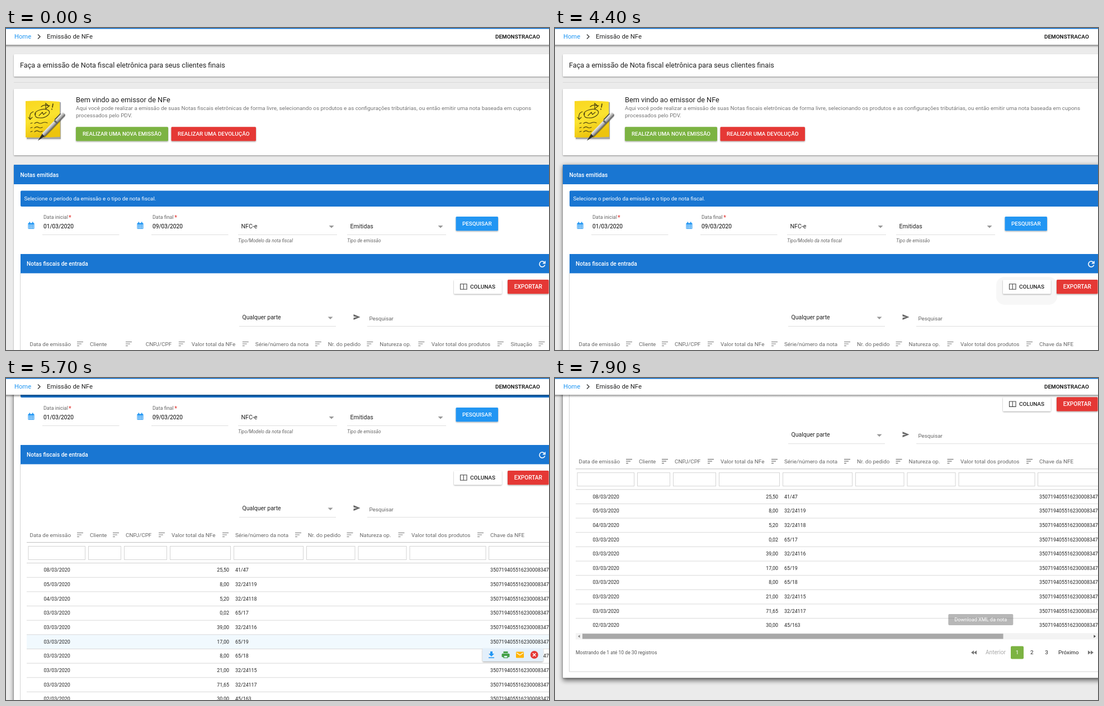
An HTML page that plays this animation: 971x577 px, repeating every 8000 ms.

```html
<!DOCTYPE html>
<html lang="pt">
<head>
<meta charset="utf-8">
<title>Emissão de NFe</title>
<style>
html, body { margin: 0; width: 100%; height: 100%; overflow: hidden; background: #ebebeb; }
svg { display: block; width: 100%; height: 100%; font-family: Roboto, sans-serif; }
text { white-space: pre; }
</style>
</head>
<body>
<svg id="stage" viewBox="0 0 971 577" xmlns="http://www.w3.org/2000/svg"></svg>
<script>
const BLUE = '#1976d2', SKY = '#2196f3', RED = '#e53935', INK = '#212121', GREY = '#757575';
const ROW0 = 616.6, PITCH = 25.65;

const rect = (x, y, w, h, fill, more = '') =>
  `<rect x="${x}" y="${y}" width="${w}" height="${h}" fill="${fill}" ${more}/>`;
const text = (x, y, s, size, fill = INK, more = '') =>
  `<text x="${x}" y="${y}" font-size="${size}" fill="${fill}" ${more}>${s}</text>`;
const path = (d, fill, more = '') => `<path d="${d}" fill="${fill}" ${more}/>`;
const line = (d, stroke, w = 1, more = '') =>
  `<path d="${d}" fill="none" stroke="${stroke}" stroke-width="${w}" ${more}/>`;
const group = (id, body, more = '') => `<g id="${id}" ${more}>${body}</g>`;
const at = (x, y, body) => `<g transform="translate(${x} ${y})">${body}</g>`;

const MED = 'font-weight="500"';
const MID = 'text-anchor="middle"';
const SHADOW = 'filter="url(#shadow)"';

const defs = `<defs>
  <filter id="shadow" x="-10%" y="-20%" width="120%" height="150%">
    <feDropShadow dx="0" dy="1.2" stdDeviation="1.1" flood-opacity=".38"/></filter>
  <filter id="blur" x="-20%" y="-20%" width="140%" height="140%"><feGaussianBlur stdDeviation="4"/></filter>
  <linearGradient id="paper" x1="0" y1="0" x2="0.3" y2="1">
    <stop offset="0" stop-color="#f9d71f"/><stop offset=".55" stop-color="#fbe32f"/><stop offset="1" stop-color="#edc40d"/></linearGradient>
  <linearGradient id="pen" x1="0" y1="0" x2="0" y2="1">
    <stop offset="0" stop-color="#eee"/><stop offset=".5" stop-color="#b5b5b5"/><stop offset="1" stop-color="#555"/></linearGradient>
  <linearGradient id="menuFill" x1="0" y1="0" x2="0" y2="1">
    <stop offset="0" stop-color="#f4f4f4"/><stop offset=".12" stop-color="#fcfcfc"/></linearGradient>
  <linearGradient id="barShade" x1="0" y1="0" x2="0" y2="1">
    <stop offset="0" stop-opacity=".4"/><stop offset="1" stop-opacity="0"/></linearGradient>
</defs>`;

function button(x, y, w, label, fill, size = 9.9) {
  return rect(x, y, w, 25.3, fill, `rx="1.5" ${SHADOW}`) +
    text(x + w / 2, y + 15.7, label, size, '#fff', `${MED} ${MID}`);
}

function stickyNote() {
  const ink = (d, w = 1.2) => line(d, '#4b4210', w, 'stroke-linecap="round"');
  return rect(37, 133, 61, 66, '#000', 'opacity=".35" filter="url(#shadow)"') +
    path('M35 131Q66 129 96 132L97 195Q66 197 35 196Z', 'url(#paper)') +
    ink('M52 156C49 148 68 143 75 147C83 152 72 162 60 161C54 161 51 159 53 153') +
    ink('M59 157L65 151L67 155L72 151') + ink('M49 150Q41 152 43 164L40 160M43 164L47 160') +
    ink('M63 141Q68 136 77 140L71 135V145L78 139') + ink('M84 136L83 142M82 145V146', 1.6) +
    [171, 179, 186].map((y, i) =>
      ink(`M44 ${y}l3 -1M51 ${y}q4 -3 7 -1t7 0${i ? '' : 't9 0'}`)).join('') +
    `<g transform="translate(57 202) rotate(-46)">` +
    rect(11, -2, 56, 7, '#000', 'opacity=".25" rx="3"') +
    path('M0 0L15 -3.2V3.2Z', '#2d2d2d') + rect(14, -3.8, 54, 7.6, 'url(#pen)', 'rx="2.5"') +
    rect(45, -3.8, 3, 7.6, '#666') + line('M48 -4.5H63', '#444', 1.6) + '</g>';
}

const calendar = (x, y) => at(x, y,
  rect(-5.5, -4.5, 11, 10.5, SKY, 'rx="1"') + line('M-2.7 -6.5V-3M2.7 -6.5V-3', SKY, 1.8) +
  line('M-4.6 -.7H4.6M-4.6 1.8H4.6M-4.6 4.3H4.6', '#fff', 1.5, 'stroke-dasharray="1.7 .8"'));
const caret = (x, y) => path(`M${x - 4.5} ${y - 2}h9l-4.5 4.5z`, '#999');
const rule = (x1, x2, y) => line(`M${x1} ${y}H${x2}`, '#dedede');

function dateField(x, label, value, starX) {
  return calendar(x - 22, 354) + text(x, 342, label, 8.95, '#666') +
    text(starX, 343, '*', 10.5, RED, MED) + text(x, 359, value, 10.15, '#000') + rule(x - 2, x + 135.5, 370.5);
}

function selectField(x, value, hint) {
  return text(x + 5.5, 358.5, value, 10.6) + caret(x + 167, 356) + rule(x, x + 177, 370.5) +
    text(x, 384, hint, 8.45, '#666', 'font-style="italic"');
}

// label, text x, sort icon x
const columns = [
  ['Data de emissão', 42.5, 127], ['Cliente', 150, 191], ['CNPJ/CPF', 214, 273],
  ['Valor total da NFe', 296, 387], ['Série/número da nota', 410, 517], ['Nr. do pedido', 540, 609.5],
  ['Natureza op.', 632.5, 701.5], ['Valor total dos produtos', 725, 843]
];
const sortIcon = x => line(`M${x} 562.5h11M${x} 566h8M${x} 569.5h4`, GREY, 1.2);

function headings(withKey) {
  const shift = withKey ? 0 : 35.8;
  const cols = columns.map(([s, x, ix], i) =>
    text(x + (i > 1 ? shift : 0), 570, s, 9.87, '#666') +
    sortIcon(ix + (i > 1 ? shift : i && !withKey ? 23 : 0))).join('');
  return cols + (withKey ? text(866, 570, 'Chave da NFE', 9.87, '#666')
    : text(902.5, 570, 'Situação', 9.87, '#666') + sortIcon(952.5));
}

const invoices = [
  ['08', '25,50', '41/47'], ['05', '8,00', '32/24119'], ['04', '5,20', '32/24118'],
  ['03', '0,02', '65/17'], ['03', '39,00', '32/24116'], ['03', '17,00', '65/19'],
  ['03', '8,00', '65/18'], ['03', '21,00', '32/24115'], ['03', '71,65', '32/24117'],
  ['02', '30,00', '45/163']
];

function tableRows() {
  return invoices.map(([day, total, num], i) => {
    const y = ROW0 + i * PITCH, base = y + 15.8;
    return (i ? line(`M37 ${y}H971`, '#d9d9d9') : '') +
      text(67.5, base, day + '/03/2020', 8.9) + text(399, base, total, 8.9, INK, 'text-anchor="end"') +
      text(410, base, num, 8.9) + text(866, base, '350719405516230008347', 8.9);
  }).join('');
}

function filters() {
  const edges = [[40, 141.5], [147.5, 205.5], [211.5, 287.5], [293.5, 401.5], [407.5, 531.5],
    [537.5, 624], [630, 716], [722, 858], [863.5, 990]];
  return edges.map(([a, b]) => rect(a, 586.5, b - a, 24, '#fff', 'stroke="#d4d4d4"')).join('') +
    line('M37 579.7H971', '#bdbdbd') + line(`M37 ${ROW0}H971`, '#d0d0d0');
}

const actions = group('actions',
  rect(852, -1, 108.5, 23.3, '#e3effa', `rx="2" ${SHADOW}`) +
  path('M866 4.5h4v4h3l-5 5l-5 -5h3zM863 15h10v1.6h-10z', SKY) +
  at(893.5, 10.5, rect(-4, -6, 8, 3, '#43a047') + rect(-7, -2.3, 14, 6.5, '#43a047', 'rx="1.5"') +
    rect(-4, 1, 8, 5, '#43a047') + rect(-2.7, 2, 5.4, 2.8, '#e3effa')) +
  rect(912, 5, 14, 11, '#ffb300', 'rx="1.2"') + line('M913 7L919 11L925 7', '#fff', 1.4) +
  '<circle cx="944.7" cy="10.5" r="7" fill="#e53935"/>' + line('M942 7.8l5.4 5.4m0 -5.4l-5.4 5.4', '#fff', 1.5));

const skip = (x, dir) => path(`M${x} 908.7l${5 * dir} -3.7v7.4zM${x - 5 * dir} 908.7l${5 * dir} -3.7v7.4z`, GREY);

function footer() {
  return rect(37, 874, 934, 11.3, '#f3f3f3') + rect(49, 875, 752.5, 9.3, '#c1c1c1', 'id="thumb"') +
    path('M41 879.7l3.5 -2.7v5.4z', '#888') + path('M967 879.7l-3.5 -2.7v5.4z', '#444') +
    text(37, 911.5, 'Mostrando de 1 até 10 de 30 registros', 8.62, '#555') +
    skip(749, 1) + skip(958, -1) + text(770, 912, 'Anterior', 10.1, '#aaa') +
    rect(815, 897.3, 23, 23, '#7cb342', 'rx="2"') + text(826.5, 912, '1', 9.9, '#fff', MID) +
    text(852.7, 912, '2', 9.9, INK, MID) + text(879, 912, '3', 9.9, INK, MID) + text(900, 912, 'Próximo', 9.9);
}

function menu() {
  const items = ['Data de emissão', 'Cliente', 'CNPJ/CPF', 'Valor total da NFe', 'Série/número da nota',
    'Nr. do pedido', 'Natureza op.', 'Valor total dos produtos', 'Chave da NFE', 'Situação'];
  const tick = y => rect(811.5, y - 6.3, 12.6, 12.6, '#00897b', 'rx="1"') +
    line(`M814 ${y}l3 3l5.3 -6`, '#fff', 1.4);
  return rect(801, 229, 142, 220, '#000', 'opacity=".42" filter="url(#blur)"') +
    rect(801, 227, 142, 220, 'url(#menuFill)', 'rx="1"') +
    text(811.5, 248, 'VISIBILIDADE DAS COLUNAS', 8.7, '#8c8c8c', MED) +
    items.map((s, i) => {
      const y = 263.5 + i * 18.12;
      const box = i === 8
        ? rect(812, y - 5.8, 11.6, 11.6, '#fff', 'rx="1" stroke="#666"') + group('keyTick', tick(y))
        : tick(y);
      return box + text(824, y + 2.5, s, 9.9);
    }).join('');
}

function page() {
  const intro = rect(14, 47, 990, 40, '#fff', `rx="1.5" ${SHADOW}`) +
    text(25, 71, 'Faça a emissão de Nota fiscal eletrônica para seus clientes finais', 12.68) +
    line('M14 97.5H971', '#d9d9d9') +
    rect(14, 109, 990, 119, '#fff', `rx="1.5" ${SHADOW}`) + stickyNote() +
    text(125, 133, 'Bem vindo ao emissor de NFe', 12.73) +
    text(125, 147.3, 'Aqui você pode realizar a emissão de suas Notas fiscais eletrônicas de forma livre, selecionando os produtos e as configurações tributárias, ou então emitir uma nota baseada em cupons', 9.86, GREY) +
    text(125, 160.2, 'processados pelo PDV.', 9.86, GREY) +
    button(125, 177.3, 165, 'REALIZAR UMA NOVA EMISSÃO', '#7cb342', 9.75) +
    button(295.5, 177.3, 151.5, 'REALIZAR UMA DEVOLUÇÃO', RED, 9.88);

  const search = rect(14, 247, 990, 712, '#000', 'id="lift" filter="url(#blur)"') +
    rect(14, 245, 990, 709, '#fff', `rx="1.5" ${SHADOW}`) +
    rect(14, 245, 990, 35, BLUE) + text(25.5, 266.5, 'Notas emitidas', 10.15, '#fff', MED) +
    rect(26, 291.5, 980, 28.5, BLUE, 'rx="2"') +
    text(32.5, 309.3, 'Selecione o período da emissão e o tipo de nota fiscal.', 9.75, '#fff') +
    dateField(67, 'Data inicial', '01/03/2020', 112) + dateField(262, 'Data final', '09/03/2020', 301.3) +
    selectField(415, 'NFC-e', 'Tipo/Modelo da nota fiscal') + selectField(610, 'Emitidas', 'Tipo de emissão') +
    button(804.5, 338, 75.5, 'PESQUISAR', SKY);

  const tools = line('M25.5 439V943H975', '#d4d4d4') + rect(26, 405, 980, 34.5, BLUE) +
    text(37, 426, 'Notas fiscais de entrada', 10.1, '#fff', MED) +
    line('M963 420.2A5 5 0 1 0 963.7 424.5', '#fff', 1.6) + path('M964.8 417v5.6h-5.6z', '#fff') +
    rect(789, 446, 109, 50, '#f7f7f7', 'id="halo" rx="15"') +
    rect(801, 453, 85.5, 25, '#000', 'id="press" filter="url(#blur)"') +
    rect(801, 451, 85.5, 25.3, '#fff', `rx="1.5" ${SHADOW}`) +
    line('M812.5 458.8h11.5v9.4h-11.5zM818.2 458.8v9.4', '#444', 1.1) +
    text(830, 467, 'COLUNAS', 9.97, INK, MED) + button(897, 451, 73.5, 'EXPORTAR', RED, 10.1) +
    text(422.5, 522.3, 'Qualquer parte', 10.5) + caret(580, 519.5) + rule(417, 590, 534.5) +
    path('M621.5 513l12 5l-12 5v-3.8l6.5 -1.2l-6.5 -1.2z', '#666') +
    text(649.5, 523.7, 'Pesquisar', 9.8, '#666') + rule(646, 971, 534.5);

  const table = rect(37, 0, 934, PITCH, '#f1f9fe', 'id="hover"') + rect(37, 0, 934, PITCH, '#f8f8f8', 'id="fade"') +
    filters() + group('plainHead', headings(false)) + group('keyHead', headings(true)) + tableRows() + footer();

  return group('page', intro + search + tools + table + actions + group('menu', menu()));
}

const topBar = rect(0, 30, 971, 5, 'url(#barShade)') + rect(0, 0, 971, 30, '#fff') + rect(0, 0, 971, 1.6, BLUE) +
  text(15, 19.3, 'Home', 11.2, SKY) + line('M57 11.5l4 4l-4 4', '#444', 1.5) +
  text(73, 19.3, 'Emissão de NFe', 11.36) + text(875, 19.2, 'DEMONSTRACAO', 9.95, INK, 'font-weight="700"');

const tip = group('tip', rect(0, 0, 116, 20, '#616161', 'id="tipBox" rx="2"') +
  text(58, 13.3, 'Download XML da nota', 9.1, '#fff', `id="tipText" ${MID}`));

document.getElementById('stage').innerHTML = defs + rect(0, 0, 971, 577, '#ebebeb') + page() + tip + topBar;

const el = {};
document.querySelectorAll('[id]').forEach(n => { el[n.id] = n; });
const set = (id, name, value) => el[id].setAttribute(name, value);
const show = (id, on) => set(id, 'opacity', +on);

// 0 to 1 in n steps of 100 ms, the first one already visible at the start time
const ramp = (t, start, n = 3) => Math.max(0, Math.min(1, (Math.floor((t - start) / 100) + 1) / n));
const pick = (t, keys) => keys.reduce((v, [time, value]) => t >= time ? value : v, keys[0][1]);

const scrollKeys = [[0, 0], [5000, 71.2], [5300, 142.5], [5500, 213.7], [5700, 285], [6800, 356.2], [7000, 416.8]];
const hoverKeys = [[0, -1], [5700, 5], [6600, 1], [6800, 4], [7000, 6], [7400, -1]];

function draw(t) {
  set('page', 'transform', `translate(0 ${-pick(t, scrollKeys)})`);
  set('lift', 'opacity', 0.55 * ramp(t, 300));

  const open = ramp(t, 1100) - ramp(t, 4200);
  show('menu', open);
  set('press', 'opacity', 0.4 * open);
  show('halo', t < 5000 ? ramp(t, 1100) : 0);

  const withKey = t >= 3200;
  show('keyTick', withKey);
  show('keyHead', withKey);
  show('plainHead', !withKey);

  const row = pick(t, hoverKeys), y = ROW0 + row * PITCH;
  show('hover', row < 0 ? 0 : t >= 7000 && t < 7200 ? 0.6 : 1);
  set('hover', 'y', y);
  show('actions', row >= 0);
  set('actions', 'transform', `translate(0 ${y + PITCH})`);
  show('fade', t >= 6600 && t < 6800);
  set('fade', 'y', ROW0 + 5 * PITCH);

  const late = t >= 7400, w = late ? 116 : 110, h = late ? 20 : 22;
  set('tip', 'transform', late ? 'translate(703.3 423)' : 'translate(711 478.5)');
  set('tipBox', 'width', w);
  set('tipBox', 'height', h);
  set('tipText', 'x', w / 2);
  set('tipText', 'y', h / 2 + 3.2);
  show('tip', late ? 0.95 - 0.5 * ramp(t, 7600, 4) : t >= 6200 ? 0.9 * (1 - ramp(t, 6400)) : 0);
  set('thumb', 'fill', t >= 7600 ? '#a8a8a8' : '#c1c1c1');
}

const begin = performance.now();
function tick() {
  draw((performance.now() - begin) % 8000);
  requestAnimationFrame(tick);
}
tick();
</script>
</body>
</html>
```
